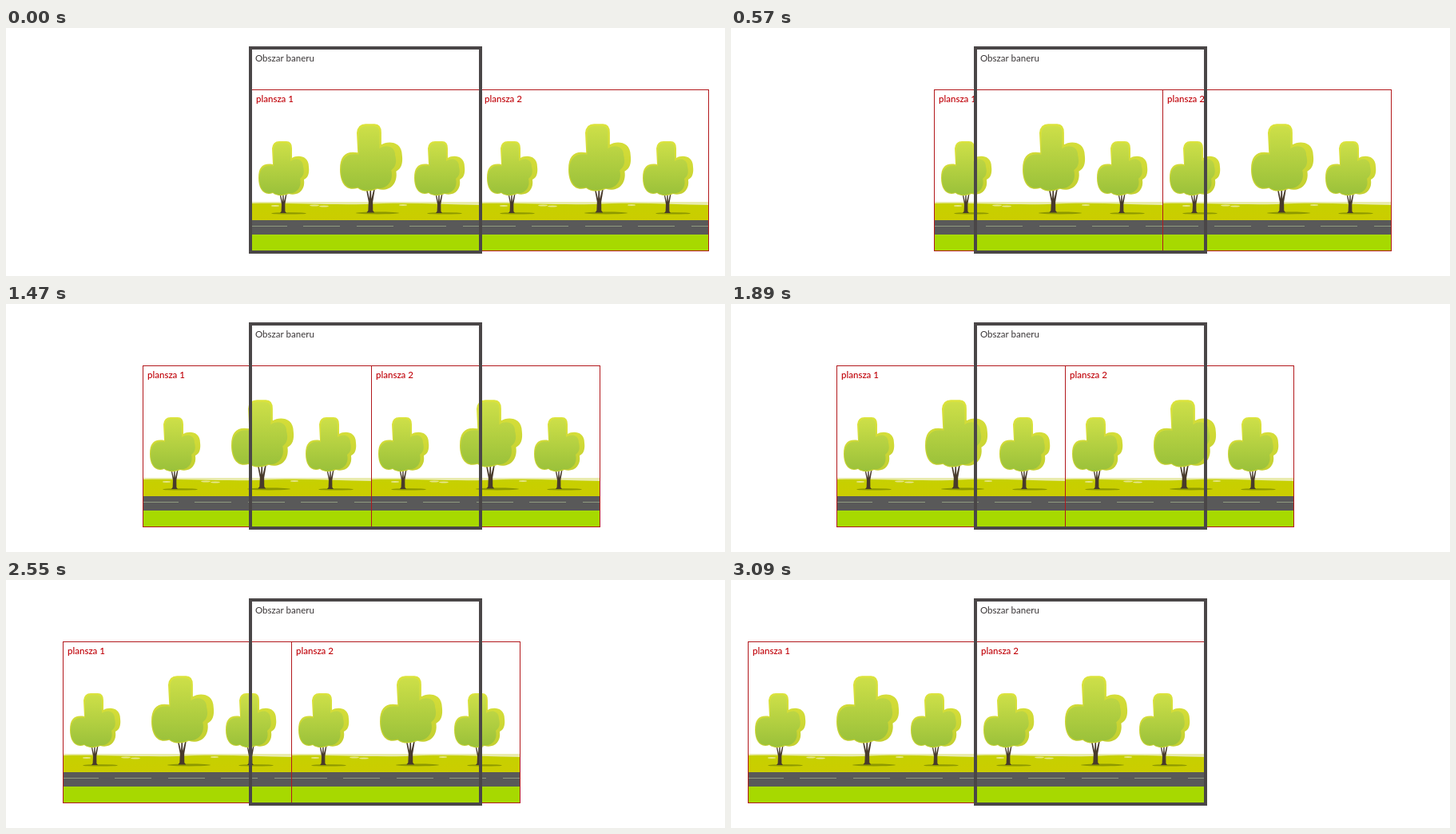
Recreate the animation shown at these times as an HTML page with a canvas. Size 900x311 px, loop 3.12 s.

```html
<!DOCTYPE html>
<html lang="pl">
<head>
<meta charset="utf-8">
<style>
html, body { margin: 0; width: 100%; height: 100%; overflow: hidden; background: #fff; }
canvas { display: block; }
</style>
</head>
<body>
<canvas id="stage" width="900" height="311"></canvas>
<script>
const ctx = document.getElementById('stage').getContext('2d');
const TILE = 286, TOP = 77, BOTTOM = 279;
const START = 307, STEP = 30, STEPS = 104;
const FONT = '11.5px Lato, "Open Sans", sans-serif';

// Tree outlines relative to the foot of the trunk
const crownBack = new Path2D('M-13-61L-14-81Q-13-90-5-90L4-90Q11-90 11-81L11-69' +
  'C17-73 32-73 32-58C33-50 31-44 26-42C28-28 18-21 7-24C0-21-8-21-13-25' +
  'C-25-21-31-31-31-44C-31-58-25-63-13-61Z');
const crownFront = new Path2D('M-12-59L-12-79Q-12-88-4-88L2-88Q10-88 9-79L9-65' +
  'C14-69 25-69 25-58C27-50 25-46 21-43C24-31 15-23 6-25C-1-22-8-22-13-26' +
  'C-24-22-30-32-30-43C-30-55-24-61-12-59Z');
const trunk = new Path2D('M-4.5-24L-3.3-24L-1-14L-.6-24L.6-24L.8-14L3.3-24L4.5-24' +
  'L2.3-11L2.4-2L4 0L-4 0L-2.4-2L-2-11Z');

function rect(c, color, x, y, w, h) {
  c.fillStyle = color;
  c.fillRect(x, y, w, h);
}

function oval(c, color, x, y, rx, ry) {
  c.fillStyle = color;
  c.beginPath();
  c.ellipse(x, y, rx, ry, 0, 0, Math.PI * 2);
  c.fill();
}

function fade(c, y0, y1, from, to) {
  const g = c.createLinearGradient(0, y0, 0, y1);
  g.addColorStop(0, from);
  g.addColorStop(1, to);
  return g;
}

function tree(c, x, y, scale) {
  c.save();
  c.translate(x, y);
  c.scale(scale, scale);
  oval(c, '#8d9800', 7, 0.4, 22, 1.2);
  c.fillStyle = '#483a2b';
  c.fill(trunk);
  c.fillStyle = fade(c, -90, -22, '#dbe33c', '#c3cf30');
  c.fill(crownBack);
  c.fillStyle = fade(c, -88, -23, '#cddf48', '#9ac13a');
  c.fill(crownFront);
  c.restore();
}

function makeTile() {
  const tile = document.createElement('canvas');
  tile.width = TILE;
  tile.height = 311;
  const c = tile.getContext('2d');

  rect(c, '#e9ebae', 0, 218, TILE, 4);
  c.fillStyle = fade(c, 219, 241, '#c6d000', '#cbcd00');
  c.beginPath();
  c.moveTo(0, 220);
  c.bezierCurveTo(50, 219, 90, 222, 143, 221);
  c.bezierCurveTo(190, 218, 240, 221, TILE, 222);
  c.lineTo(TILE, 241);
  c.lineTo(0, 241);
  c.fill();
  for (const [x, y, r] of [[30, 223, 5], [79, 222.5, 6], [91, 223.5, 6], [190, 222, 5]])
    oval(c, '#e6e68c', x, y, r, 0.9);

  rect(c, '#595959', 0, 241, TILE, 18);
  for (let x = -1; x < TILE; x += 66.4) rect(c, '#8f9a80', Math.round(x), 248, 46, 1);
  rect(c, '#a7d900', 0, 259, TILE, 21);

  tree(c, 40, 232, 1);
  tree(c, 149.3, 231.5, 1.235);
  tree(c, 235, 232, 1);
  return tile;
}

const tile = makeTile();

function board(x, label) {
  ctx.drawImage(tile, x, 0);
  ctx.font = '500 ' + FONT;
  ctx.fillStyle = '#c00008';
  ctx.fillText(label, x + 6, 93);
}

function draw(now) {
  const i = Math.floor((now % (STEP * STEPS)) / STEP);
  const x = Math.round(START - TILE * i / (STEPS - 1));
  rect(ctx, '#fff', 0, 0, 900, 311);
  board(x, 'plansza 1');
  board(x + TILE, 'plansza 2');

  const line = '#b2181c';
  for (const y of [TOP, BOTTOM]) rect(ctx, line, x, y, 2 * TILE + 1, 1);
  for (const n of [0, 1, 2]) rect(ctx, line, x + n * TILE, TOP, 1, BOTTOM - TOP + 1);

  ctx.strokeStyle = '#4a4647';
  ctx.lineWidth = 4;
  ctx.strokeRect(306, 25, 288, 256);
  ctx.font = FONT;
  ctx.fillStyle = '#3a3637';
  ctx.fillText('Obszar baneru', 312, 42);
  requestAnimationFrame(() => draw(performance.now() - start));
}

const start = performance.now();
draw(0);
</script>
</body>
</html>
```
